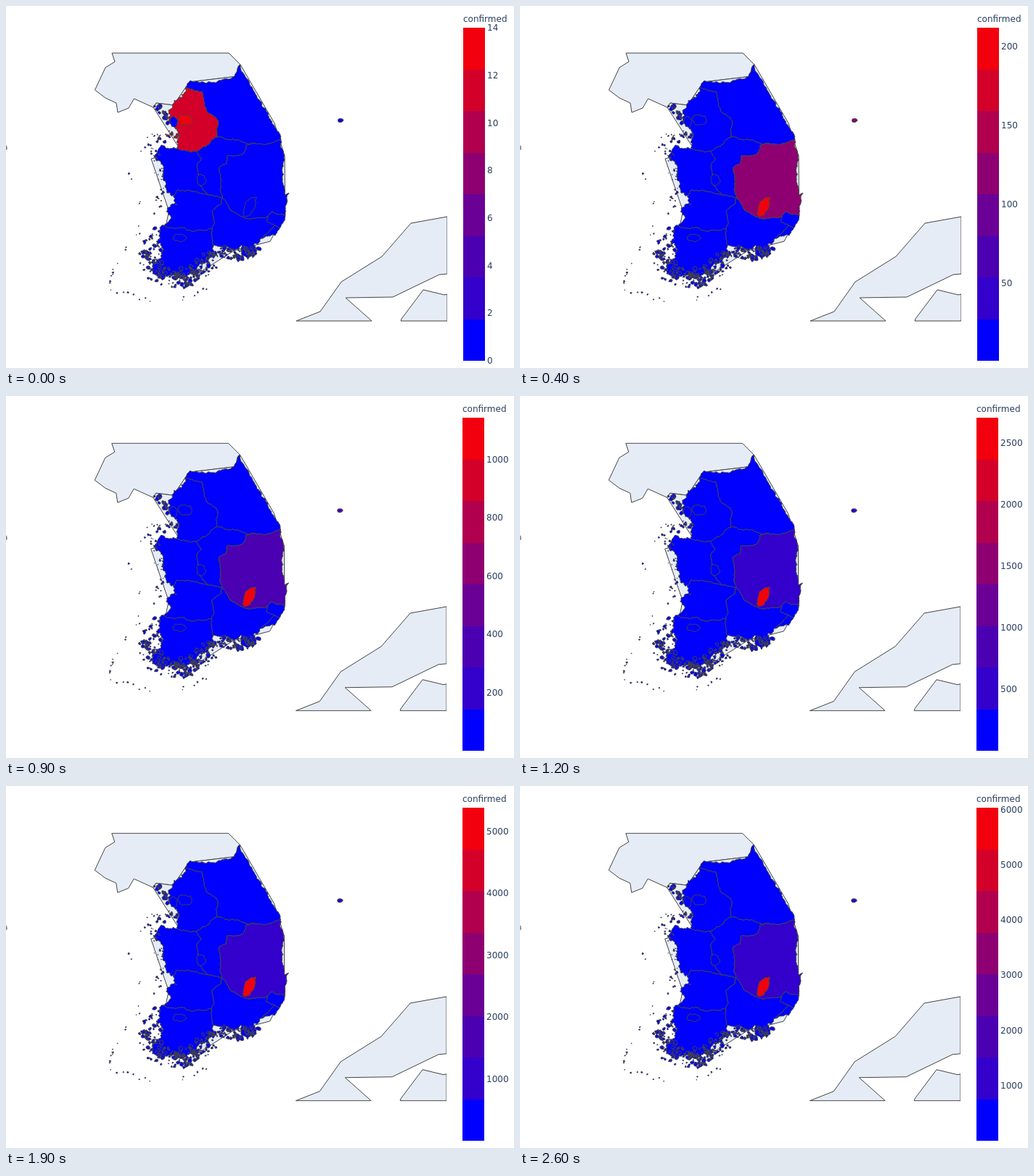
Write an HTML page that moves like this. It is 700x500 px and loops after 2700 ms.

```html
<!DOCTYPE html>
<html lang="en">
<head>
<meta charset="utf-8">
<title>Confirmed cases map</title>
<style>
  html, body { margin: 0; width: 100%; height: 100%; overflow: hidden; background: #fff; }
  svg { display: block; width: 700px; height: 500px; }
  path { stroke: #444; stroke-width: 1; stroke-linejoin: round; }
  rect { shape-rendering: crispEdges; }
  .land { fill: #e5ecf6; }
  text { font: 12px "DejaVu Sans", Verdana, sans-serif; fill: #2a3f5f; }
</style>
</head>
<body>
<svg viewBox="0 0 700 500">
  <clipPath id="frame"><rect y="64" width="608" height="372"/></clipPath>
  <g id="map"><g id="shapes" clip-path="url(#frame)"></g></g>
  <g id="bar"><text x="630" y="22">confirmed</text><g id="ticks"></g></g>
</svg>
<script>
const STEP = 100, DAYS = 27;
const BAR = { x: 630, top: 30, bottom: 490, width: 30 };
const COLORS = ['#0000ff', '#3300cc', '#4b00b2', '#6a0095', '#8e0071', '#b1004e', '#d3002a', '#f2000d'];

// Key days: the largest count, and each region's share of it.
const PEAK = { 0: 14, 2: 30, 4: 212, 6: 483, 12: 2705, 16: 4326, 19: 5381, 22: 5794, 26: 6031 };
const SHARES = {
  daegu: { 0: 0, 2: 1 },
  gyeongbuk: { 0: 0, 2: .8, 4: .53, 6: .41, 12: .205, 26: .192 },
  seoul: { 0: 1, 2: .66, 4: 0 },
  gyeonggi: { 0: .8, 2: .44, 4: 0 },
  busan: { 0: 0, 2: .3, 4: 0 }
};

// Points where borders meet, and the bends between them.
const NODES = {
  A: '248,112', B: '291,181', C: '344,190', D: '379,184', E: '262,201', F: '236,197',
  G: '278,261', H: '298,265', J: '231,264', K: '217,303', L: '284,308', M: '286,331',
  N: '361,291', O: '385,289', P: '371,303', Q: '377,307', R: '352,321'
};
const EDGES = {
  AD: '254,103 306,101 315,97 322,81 339,112 361,147 376,174',
  DO: '383,210 381,240 384,261 390,258',
  OQ: '384,296',
  QR: '371,317',
  RM: '342,328 344,344 328,345 324,330 309,336 297,333',
  MK: '292,345 278,351 263,365 240,371 222,374 202,370 213,345 212,315',
  KJ: '227,294 221,284 236,274',
  JF: '219,250 216,220 203,206 214,192',
  FA: '236,170 224,144 232,130',
  AB: '270,118 279,148 292,158',
  BE: '281,189',
  EF: '248,200',
  BC: '312,184',
  CD: '365,190',
  CH: '331,192 326,205 305,207 304,218 294,223 296,240',
  EG: '269,211 263,219 266,246',
  JG: '236,254 259,256',
  GH: '290,263',
  HL: '297,273 284,283',
  KL: '234,308 260,311',
  LM: '284,320',
  HN: '311,283 326,291',
  NO: '367,284',
  NP: '359,297',
  PQ: '374,305',
  PR: '357,316'
};
const ROUGH = ['RM', 'MK', 'KJ', 'JF', 'FA'];
const REGIONS = {
  gangwon: 'ADCB', gyeonggi: 'ABEF', chungbuk: 'BCHGE', chungnam: 'FEGJ', jeonbuk: 'JGHLK',
  jeonnam: 'KLM', gyeongnam: 'HNPRML', gyeongbuk: 'CDONH', ulsan: 'NOQP', busan: 'PQR'
};

// Cities inside a region: centre, radii, tilt.
const CITIES = {
  incheon: [231, 160, 5, 7, 0],
  seoul: [247, 157, 10, 7, 0],
  daejeon: [269, 240, 6, 8, 0],
  gwangju: [239, 320, 9, 5, 0],
  daegu: [336, 277, 7, 14, .5]
};

// Islands strewn along a line: region, line, spread, number, largest radius.
const CHAINS = [
  ['incheon', '207,139 220,148 219,160', 5, 16, 4],
  ['gyeonggi', '223,174 234,182', 5, 10, 3],
  ['incheon', '198,180 222,184', 7, 16, 2.2],
  ['chungnam', '190,194 207,208 216,250 212,290', 8, 38, 1.5],
  ['jeonnam', '206,320 194,348 208,370 240,378 262,368 290,346', 14, 190, 3.2],
  ['gyeongnam', '294,342 344,338', 10, 60, 3.5],
  ['jeonnam', '168,218 190,300 152,350 144,391 212,412 280,392', 5, 30, 1.3]
];

const LANDS = [
  '146,65 307,65 323,81 315,97.5 252.6,105 231,137 207,134 203,140 176.5,128 169,141 154,147 152,134 137,127 122.5,116 137,85 150,77',
  '323,81 370,162 384,207 384.5,287 364,325 314,338 270,366 221,372 214,335 224.5,283 200,211 241,200 203,140 207,134 231,137 252.6,105 315,97.5',
  '400,435 433,422 462,381 518,346 558,300 608,291 608,370 597,371 533,402 468,403 504,435',
  '544,435 545,432 575,392 604,399 608,398 608,435',
  '-1,191 1,195 1,198 -1,198'
];

const NS = 'http://www.w3.org/2000/svg';
const $ = id => document.getElementById(id);

function add(parent, tag, attrs) {
  const el = document.createElementNS(NS, tag);
  for (const key in attrs) el.setAttribute(key, attrs[key]);
  return parent.appendChild(el);
}

let seed = 7;
function random() {
  seed = (seed * 16807) % 2147483647;
  return seed / 2147483647;
}

const mix = (a, b, t) => a + (b - a) * t;
const parse = text => text.split(' ').map(p => p.split(',').map(Number));
const outline = pts => 'M' + pts.map(p => p.map(v => v.toFixed(1)).join()).join('L') + 'Z';

// Midpoint displacement turns a straight run into a ragged one.
function split(a, b, amp) {
  const dx = b[0] - a[0], dy = b[1] - a[1];
  if (Math.hypot(dx, dy) < 2.5) return [a];
  const k = (random() - .5) * 2 * amp;
  const mid = [(a[0] + b[0]) / 2 - dy * k, (a[1] + b[1]) / 2 + dx * k];
  const next = Math.min(.5, amp * 1.25);
  return [...split(a, mid, next), ...split(mid, b, next)];
}

function ragged(pts, amp) {
  const last = pts.length - 1;
  return [...pts.slice(0, last).flatMap((p, i) => split(p, pts[i + 1], amp)), pts[last]];
}

function blob(cx, cy, rx, ry, tilt, n, wobble) {
  return Array.from({ length: n }, (_, i) => {
    const a = i / n * Math.PI * 2, r = 1 + (random() - .5) * wobble;
    const x = Math.cos(a) * rx * r, y = Math.sin(a) * ry * r;
    return [cx + x * Math.cos(tilt) - y * Math.sin(tilt), cy + x * Math.sin(tilt) + y * Math.cos(tilt)];
  });
}

function chain(line, spread, count, size) {
  const pts = parse(line);
  let d = '';
  for (let i = 0; i < count; i++) {
    const t = random() * (pts.length - 1), k = Math.floor(t);
    const a = random() * Math.PI * 2, off = Math.sqrt(random()) * spread;
    const x = mix(pts[k][0], pts[k + 1][0], t - k) + Math.cos(a) * off;
    const y = mix(pts[k][1], pts[k + 1][1], t - k) + Math.sin(a) * off;
    const r = Math.max(.4, size * (.2 + .8 * random() ** 1.6));
    d += outline(blob(x, y, r, r * mix(.7, 1.2, random()), 0, 7, .8));
  }
  return d;
}

const shapes = $('shapes');
for (const land of LANDS) add(shapes, 'path', { class: 'land', d: outline(parse(land)) });

const edges = {};
for (const key in EDGES) {
  const pts = parse(`${NODES[key[0]]} ${EDGES[key]} ${NODES[key[1]]}`);
  edges[key] = ragged(pts, ROUGH.includes(key) ? .22 : .1);
}

const loop = names => [...names].flatMap((a, i) => {
  const b = names[(i + 1) % names.length];
  return edges[a + b] || [...edges[b + a]].reverse();
});

const outlines = {};
for (const name in REGIONS) outlines[name] = outline(loop(REGIONS[name]));
for (const name in CITIES) {
  const ring = blob(...CITIES[name], 9, .3);
  outlines[name] = outline(ragged([...ring, ring[0]], .2));
}
for (const [region, ...rest] of CHAINS) outlines[region] += chain(...rest);
outlines.gyeongbuk += outline(blob(461, 158, 3.7, 2.7, 0, 8, .3));

const areas = {};
for (const name in outlines) areas[name] = add(shapes, 'path', { d: outlines[name], fill: COLORS[0] });

const band = (BAR.bottom - BAR.top) / COLORS.length;
COLORS.forEach((fill, i) => add($('bar'), 'rect', {
  x: BAR.x, y: BAR.bottom - (i + 1) * band, width: BAR.width, height: band, fill
}));

// Value between key days, holding the last one.
function between(keys, day, blend = mix) {
  const days = Object.keys(keys).map(Number);
  const i = days.findLastIndex(d => d <= day), from = days[i], to = days[i + 1];
  return to === undefined ? keys[from] : blend(keys[from], keys[to], (day - from) / (to - from));
}

const grow = (a, b, t) => a * (b / a) ** t;

function tickStep(range) {
  const rough = range / 10, base = 10 ** Math.floor(Math.log10(rough));
  return [1, 2, 5, 10].find(m => m * base >= rough) * base;
}

function show(day) {
  const max = Math.round(between(PEAK, day, grow));
  const min = day < 4 ? 0 : 1;
  for (const name in SHARES) {
    const level = Math.floor(between(SHARES[name], day) * COLORS.length);
    areas[name].setAttribute('fill', COLORS[Math.min(level, COLORS.length - 1)]);
  }

  $('ticks').textContent = '';
  const step = tickStep(max - min);
  for (let v = Math.ceil(min / step) * step; v <= max; v += step) {
    const y = mix(BAR.bottom, BAR.top, (v - min) / (max - min));
    add($('ticks'), 'text', { x: BAR.x + 33, y: y + 4.2 }).textContent = v;
  }

  // Four-digit labels squeeze the plot by one pixel.
  const wide = max >= 1000;
  $('map').setAttribute('transform', wide ? `translate(0 ${250 / 608}) scale(${607 / 608})` : '');
  $('bar').setAttribute('transform', wide ? 'translate(-1 0)' : '');
}

let shown = -1;
function tick() {
  const day = Math.floor(performance.now() / STEP) % DAYS;
  if (day !== shown) show(shown = day);
  requestAnimationFrame(tick);
}
tick();
</script>
</body>
</html>
```
